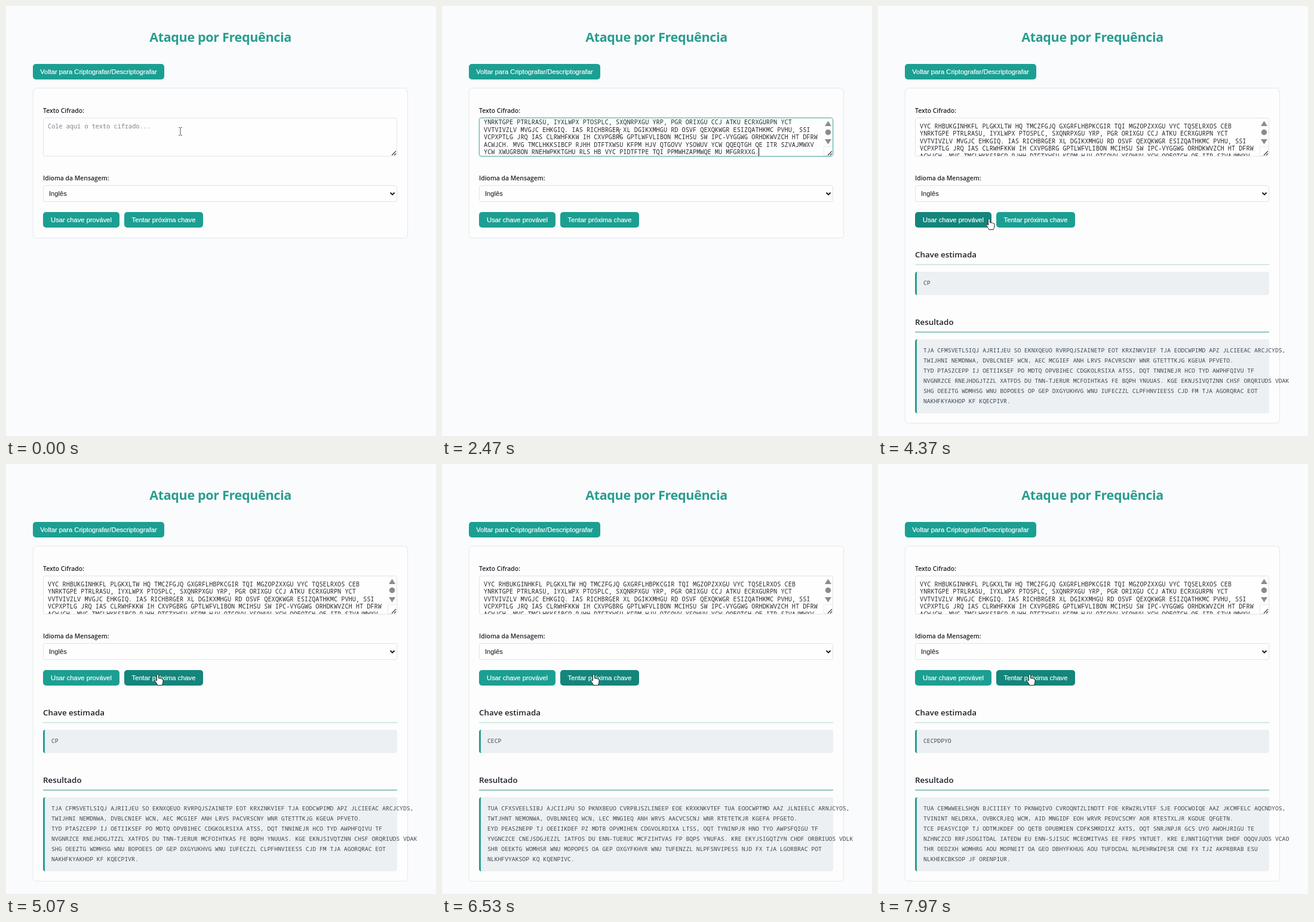
Animation, 720 px wide and 720 px high, one loop 8000 ms. Source, as an HTML page:

```html
<!DOCTYPE html>
<html lang="pt">
<head>
<meta charset="utf-8">
<title>Ataque por Frequência</title>
<style>
  html, body { margin: 0; width: 100%; height: 100%; overflow: hidden; background: #f9fbfd; }
  #stage { position: absolute; left: 0; top: 0; width: 720px; height: 720px; overflow: hidden; }
  #stage * { position: absolute; box-sizing: border-box; margin: 0; white-space: pre; }
  h1, h2, label { font-family: "Open Sans", "Noto Sans", sans-serif; line-height: 20px; color: #1c2128; }
  h1 { left: 0; width: 718px; top: 42px; text-align: center; font-size: 21.5px; font-weight: 700; letter-spacing: -.32px; color: #2a9d8f; }
  h2 { left: 62px; font-size: 13.4px; font-weight: 600; }
  label { left: 62px; font-size: 10.4px; font-weight: 600; }
  .card { left: 45px; top: 137px; width: 628px; height: 252px; border: 1px solid #e4e8ec; border-radius: 6px; background: #fdfdfd; }
  .btn { height: 26px; border-radius: 5px; background: #1c9f92; color: #fff; text-align: center;
    font: 11.18px/26px "Liberation Sans", Arial, sans-serif; -webkit-text-stroke: .2px #fff; }
  .btn.hover { background: #14857b; }
  .field { left: 62px; width: 593px; border: 1px solid #dfe3ea; border-radius: 4px; background: #fefefe; }
  .mono { font-family: "Noto Sans Mono", "DejaVu Sans Mono", monospace; color: #26282c; }
  #area { top: 187px; height: 65px; overflow: hidden; }
  #area.focus { border-color: #62b3a9; box-shadow: 0 0 0 1px #d3ebe7; }
  #cipher { left: 7px; top: 6.5px; font-size: 10.24px; line-height: 12.5px; }
  #cipher.empty { color: #82858a; }
  #caret { width: 1px; height: 13px; background: #000; }
  #select { top: 300px; height: 28px; padding-left: 9px; font: 11.18px/26px "Liberation Sans", Arial, sans-serif; color: #111; }
  .rule { left: 62px; width: 593px; height: 2px; }
  .box { left: 62px; width: 593px; border-left: 3px solid #2a9d8f; border-radius: 4px; background: #ecf0f3; }
  .box div { left: 11px; font-size: 9.72px; line-height: 17px; color: #3d444c; }
  svg { overflow: visible; }
</style>
</head>
<body>
<div id="stage">
  <h1>Ataque por Frequência</h1>
  <div class="btn" style="left:45px;top:97px;width:220px">Voltar para Criptografar/Descriptografar</div>
  <div class="card" id="card"></div>
  <label style="top:165px">Texto Cifrado:</label>
  <div class="field" id="area">
    <div class="mono" id="cipher"></div>
    <div id="caret"></div>
    <svg id="bar" width="16" height="63" style="left:576px;top:0">
      <rect width="16" height="63" fill="#fcfcfc"/>
      <path d="M2 13L7.500 4.500L13 13ZM2 35L7.500 43.500L13 35Z" fill="#8b8b8b"/>
      <circle cx="7.500" cy="23.500" r="4.700" fill="#8b8b8b"/>
      <rect x=".5" y="47.500" width="15" height="15" fill="#fff" stroke="#e8eaec"/>
    </svg>
    <svg width="8" height="8" style="left:582px;top:54px">
      <path d="M1 8L8 1M5 8L8 5" stroke="#333" stroke-width="1.100"/>
    </svg>
  </div>
  <label style="top:278px">Idioma da Mensagem:</label>
  <div class="field" id="select">Inglês<svg width="8" height="5" style="left:580px;top:11px"><path d="M.5 .5L4 4L7.500 .5" fill="none" stroke="#111" stroke-width="1.800"/></svg></div>
  <div class="btn" id="use" style="left:62px;top:345px;width:128px">Usar chave provável</div>
  <div class="btn" id="next" style="left:198px;top:345px;width:132px">Tentar próxima chave</div>
  <section id="output">
    <h2 style="top:406px">Chave estimada</h2>
    <div class="rule" style="top:432px;background:#d3ebe2"></div>
    <div class="box" style="top:445px;height:39px"><div class="mono" id="key" style="top:10px"></div></div>
    <h2 style="top:519px">Resultado</h2>
    <div class="rule" style="top:545px;background:#93c6bf"></div>
    <div class="box" style="top:558px;height:124px"><div class="mono" id="plain" style="top:10px"></div></div>
  </section>
  <svg id="pointer" width="1" height="1">
    <path id="ibeam" d="M-3 -6.500H-1L0 -5.500L1 -6.500H3M0 -5.500V5.500M-3 6.500H-1L0 5.500L1 6.500H3" fill="none" stroke="#555"/>
    <path id="hand" d="M-1.500 1.500Q0 -1 1.500 1.500V7Q3 5.600 4 7.300Q5.600 6.300 6.500 8Q8.500 7.300 9 9.500V13Q8.800 15.500 7 18.500H0Q-1.500 15.500 -4.500 11.500Q-4.800 9.300 -3 9.600L-1.500 11Z" fill="#fff" stroke="#222"/>
    <path id="arrow" d="M0 0V15L3.500 11.800L6 17L8.300 16L5.900 11H10.500Z" fill="#fff" stroke="#222"/>
  </svg>
</div>
<script>
const LOOP = 8000, FOCUS = 330, PASTE = 1370, SOLVE = 4000, BLINK = 530;
const KEYS = [[SOLVE, "CP"], [6100, "CECP"], [7200, "CECPDPYO"]];
const CIPHER = [
  "VYC RHBUKGINHKFL PLGKXLTW HQ TMCZFGJQ GXGRFLHBPKCGIR TQI MGZOPZXXGU VYC TQSELRXOS CEB",
  "YNRKTGPE PTRLRASU, IYXLWPX PTOSPLC, SXQNRPXGU YRP, PGR ORIXGU CCJ ATKU ECRXGURPN YCT",
  "VVTVIVZLV MVGJC EHKGIQ. IAS RICHBRGER XL DGIKXMHGU RD OSVF QEXQKWGR ESIZQATHKMC PVHU, SSI",
  "VCPXPTLG JRQ IAS CLRWHFKKW IH CXVPGBRG GPTLWFVLIBON MCIHSU SW IPC-VYGGWG ORHDKWVZCH HT DFRW",
  "ACWJCH. MVG TMCLHKKSIBCP RJHH DTFTXWSU KFPM HJV QTGOVV YSOWUV YCW QQEQTGH QE ITR SZVAJMWXV",
  "YCW XWUGRBON RNEHWPKKTGHU RLS HB VYC PIDTFTPE TQI PPMWHZAPMWQE MU MFGRRXXG."
];
// words per line in the result box
const WORDS = [13, 13, 15, 14, 16];
// pointer stops: time, x, y
const PATH = [
  [0, 292, 210], [330, 292, 210], [1130, 281, 207], [1230, 280, 197], [1370, 280, 197],
  [2300, 297, 213], [2650, 297, 213], [3550, 150, 361], [4100, 150, 361],
  [4370, 186, 356], [4620, 254, 352], [LOOP, 254, 352]
];

const $ = id => document.getElementById(id);
const show = (id, on) => { $(id).style.visibility = on ? "visible" : "hidden"; };
const within = (x, y, l, t, r, b) => x >= l && x <= r && y >= t && y <= b;

function setText(id, text) {
  if ($(id).textContent !== text) $(id).textContent = text;
}

function decrypt(text, key) {
  let i = 0;
  return text.replace(/[A-Z]/g, c => {
    const shift = key.charCodeAt(i++ % key.length);
    return String.fromCharCode((c.charCodeAt(0) - shift + 26) % 26 + 65);
  });
}

function layout(key) {
  const words = decrypt(CIPHER.join(" "), key).split(" ");
  const lines = WORDS.map(n => words.splice(0, n).join(" "));
  return [...lines, words.join(" ")].join("\n");
}
const RESULTS = KEYS.map(([, key]) => layout(key));

function pointerAt(t) {
  let i = 1;
  while (PATH[i][0] < t) i++;
  const [t0, x0, y0] = PATH[i - 1], [t1, x1, y1] = PATH[i];
  const p = (t - t0) / (t1 - t0), e = p * p * (3 - 2 * p);
  return [x0 + (x1 - x0) * e, y0 + (y1 - y0) * e];
}

function draw(t) {
  const pasted = t >= PASTE, solved = t >= SOLVE;
  const focused = t >= FOCUS && !solved;

  setText("cipher", pasted ? CIPHER.join("\n") : "Cole aqui o texto cifrado...");
  $("cipher").className = pasted ? "mono" : "mono empty";
  $("cipher").style.top = pasted && !solved ? "-12.5px" : "6.5px";
  $("area").classList.toggle("focus", focused);
  show("bar", pasted);

  const lit = (t - (pasted ? PASTE : FOCUS)) % (2 * BLINK) < BLINK;
  show("caret", focused && lit);
  $("caret").style.left = pasted ? "467px" : "7px";
  $("caret").style.top = pasted ? "50px" : "6px";

  $("card").style.height = solved ? "562px" : "252px";
  $("output").style.display = solved ? "block" : "none";
  if (solved) {
    const n = KEYS.filter(([at]) => t >= at).length - 1;
    setText("key", KEYS[n][1]);
    setText("plain", RESULTS[n]);
  }

  const [x, y] = pointerAt(t);
  const onUse = within(x, y, 62, 345, 190, 371), onNext = within(x, y, 198, 345, 330, 371);
  const inArea = within(x, y, 62, 187, 655, 252);
  $("use").classList.toggle("hover", onUse);
  $("next").classList.toggle("hover", onNext);
  show("ibeam", inArea);
  show("hand", onUse || onNext);
  show("arrow", !inArea && !onUse && !onNext);
  $("pointer").style.left = x + "px";
  $("pointer").style.top = y + "px";
}

function tick() {
  draw(performance.now() % LOOP);
  requestAnimationFrame(tick);
}
tick();
</script>
</body>
</html>
```
